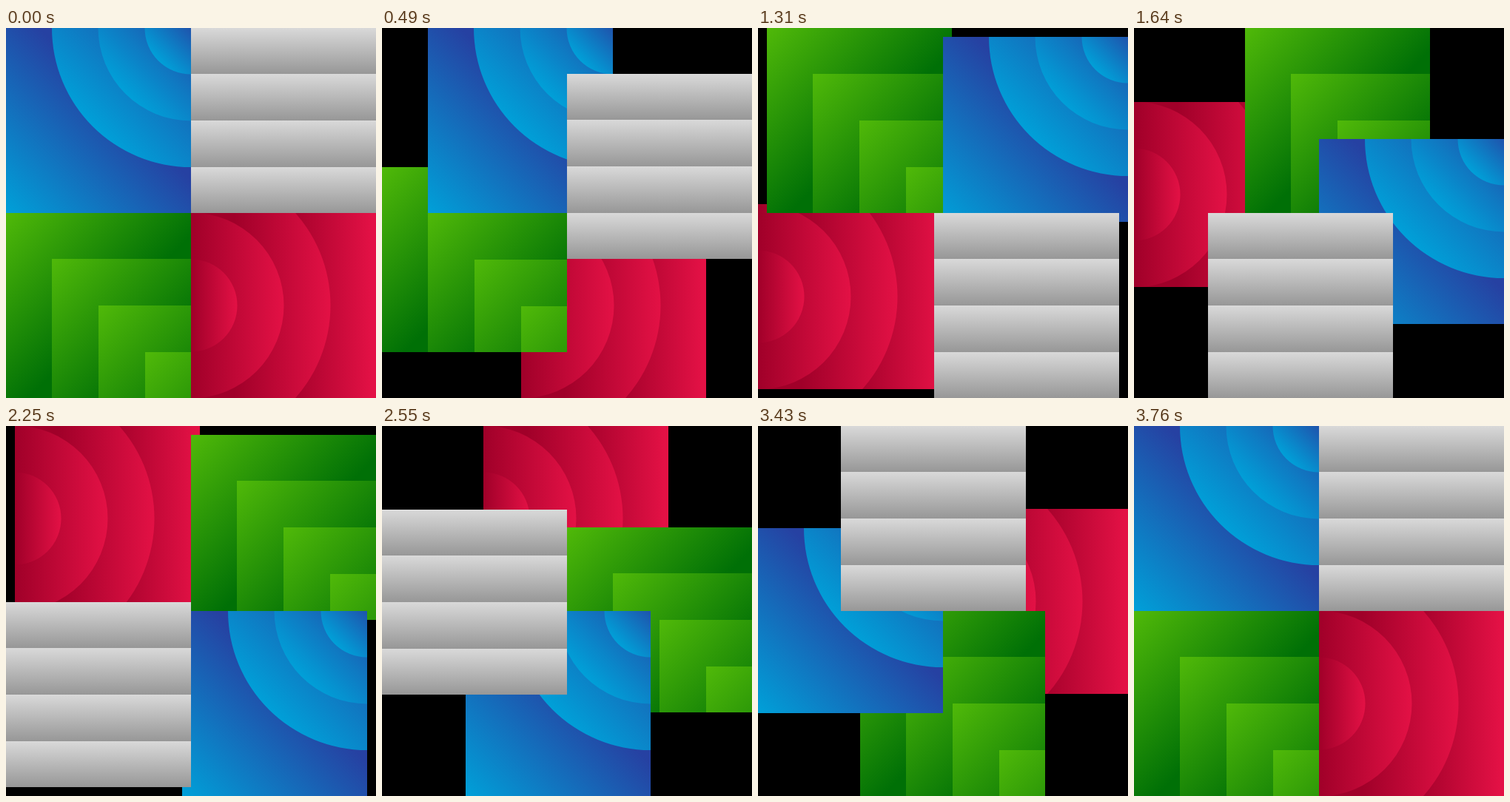
Animation, 500 px wide and 500 px high, one loop 4.06 s. Source, as an HTML page with a canvas:

```html
<!DOCTYPE html>
<html lang="en">
<head>
<meta charset="utf-8">
<title>Sliding tiles</title>
<style>
html, body { margin: 0; width: 100%; height: 100%; overflow: hidden; background: #000; }
canvas { display: block; }
</style>
</head>
<body>
<canvas id="stage" width="500" height="500"></canvas>
<script>
const ctx = document.getElementById('stage').getContext('2d');
const SIZE = 250, LOOP = 4060, MOVE = 940, STEP = 30, LEAD = 340;
const EDGES = [0, 62, 125, 188, 250];

function gradient(x0, y0, x1, y1, from, to) {
  const g = ctx.createLinearGradient(x0, y0, x1, y1);
  g.addColorStop(0, from);
  g.addColorStop(1, to);
  ctx.fillStyle = g;
}

function disc(x, y, r) {
  ctx.beginPath();
  ctx.arc(x, y, r, 0, Math.PI * 2);
  ctx.fill();
}

function red() {
  const shade = (a, b) => gradient(a, 0, b, 0, '#a00029', '#e31145');
  shade(125, 245);
  ctx.fillRect(0, 0, SIZE, SIZE);
  for (const r of [188.5, 125.5, 62.5]) {
    shade(Math.max(0, r - 130), r);
    disc(0, 125, r);
  }
}

function green() {
  for (const e of EDGES.slice(0, 4)) {
    gradient(e, e, e + 140, e + 140, '#50b909', '#007006');
    ctx.fillRect(e, e, SIZE, SIZE);
  }
}

// Shades run along the diagonal towards the top right corner.
function blue() {
  const shade = (near, far) => {
    const a = near * Math.SQRT1_2, b = far * Math.SQRT1_2;
    gradient(SIZE - a, a, SIZE - b, b, '#00a0d8', '#2641a2');
  };
  shade(353, 145);
  ctx.fillRect(0, 0, SIZE, SIZE);
  for (const r of [188, 125.5, 62.5]) {
    shade(r, -15);
    disc(SIZE, 0, r);
  }
}

function grey() {
  for (let i = 0; i < 4; i++) {
    const top = EDGES[i], end = EDGES[i + 1];
    gradient(0, top, 0, end, '#d9d9d9', '#979797');
    ctx.fillRect(0, top, SIZE, end - top);
  }
}

// Back to front, each with its starting corner counted clockwise from top left.
const tiles = [[red, 2], [green, 3], [blue, 0], [grey, 1]];

function corner(dist) {
  const side = Math.floor(dist / SIZE) % 4, o = dist % SIZE;
  return [[o, 0], [SIZE, o], [SIZE - o, SIZE], [0, SIZE - o]][side];
}

function travelled(t) {
  const u = Math.max(0, t - LEAD);
  const steps = Math.min(20, Math.floor(u % MOVE / STEP));
  return Math.floor(u / MOVE) * SIZE + Math.floor(steps * SIZE / 20);
}

function draw(now) {
  const dist = travelled(now % LOOP);
  ctx.fillStyle = '#000';
  ctx.fillRect(0, 0, 500, 500);
  for (const [paint, start] of tiles) {
    ctx.save();
    ctx.translate(...corner(start * SIZE + dist));
    ctx.beginPath();
    ctx.rect(0, 0, SIZE, SIZE);
    ctx.clip();
    paint();
    ctx.restore();
  }
  requestAnimationFrame(draw);
}
draw(performance.now());
</script>
</body>
</html>
```
